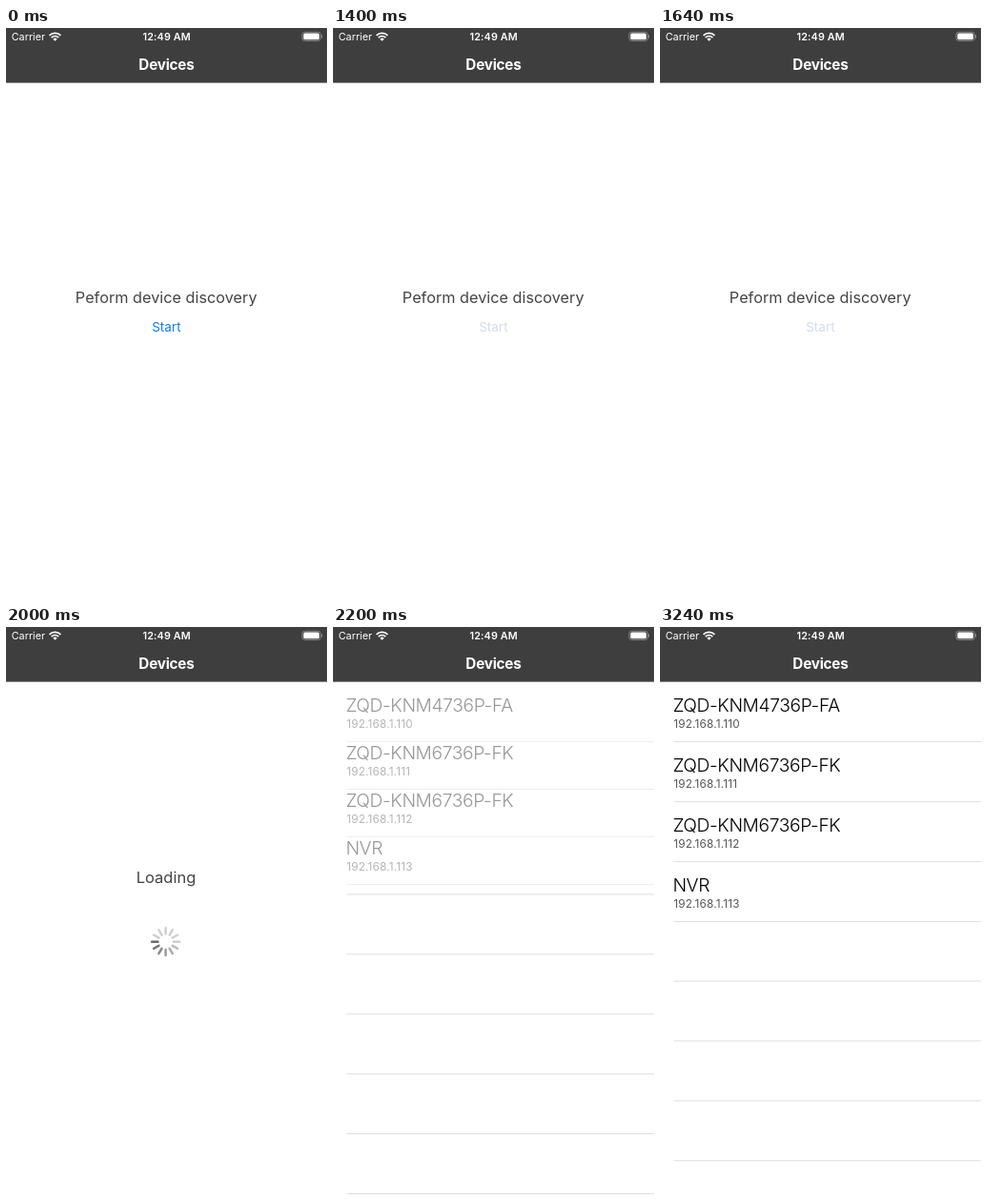
An HTML page with a canvas that plays this animation: 337 px wide and 600 px high, repeating every 3.8 s.

```html
<!DOCTYPE html>
<html lang="en">
<head>
<meta charset="utf-8">
<title>Devices</title>
<style>
html, body { margin: 0; width: 100%; height: 100%; overflow: hidden; background: #fff; }
canvas { display: block; width: 337px; height: 600px; }
</style>
</head>
<body>
<canvas id="stage"></canvas>
<script>
const W = 337, H = 600, LOOP = 3800;
const PRESS = 1400, LOADING = 1800, INSERT = 2200, LIST = 2400;
const canvas = document.getElementById('stage');
const ctx = canvas.getContext('2d');
const scale = window.devicePixelRatio || 1;
canvas.width = W * scale;
canvas.height = H * scale;

const devices = ['ZQD-KNM4736P-FA', 'ZQD-KNM6736P-FK', 'ZQD-KNM6736P-FK', 'NVR'];

function text(str, x, y, size, color, { weight = 400, align = 'left', spacing = 0 } = {}) {
  ctx.font = `${weight} ${size}px Inter, sans-serif`;
  ctx.letterSpacing = spacing + 'px';
  ctx.textAlign = align;
  ctx.fillStyle = color;
  ctx.fillText(str, x, y);
}

function box(x, y, w, h, r, color, stroked) {
  ctx.beginPath();
  ctx.roundRect(x, y, w, h, r);
  if (stroked) {
    ctx.strokeStyle = color;
    ctx.lineWidth = 0.9;
    ctx.stroke();
  } else {
    ctx.fillStyle = color;
    ctx.fill();
  }
}

function wifi(x, y) {
  const half = Math.PI * 0.25, up = -Math.PI / 2;
  ctx.strokeStyle = ctx.fillStyle = '#fff';
  ctx.lineWidth = 1.7;
  for (const r of [8.4, 5.3]) {
    ctx.beginPath();
    ctx.arc(x, y, r, up - half, up + half);
    ctx.stroke();
  }
  ctx.beginPath();
  ctx.moveTo(x, y);
  ctx.arc(x, y, 3, up - half, up + half);
  ctx.fill();
}

function header() {
  ctx.fillStyle = '#3e3e3e';
  ctx.fillRect(0, 0, W, 57);
  ctx.fillStyle = '#858585';
  ctx.fillRect(0, 57, W, 1);
  text('Carrier', 5.7, 13, 10.8, '#fff');
  wifi(51.5, 13.8);
  text('12:49 AM', 168.7, 13, 10.8, '#fff', { weight: 600, align: 'center', spacing: 0.15 });
  box(310.9, 4.3, 19.4, 9.2, 2.6, '#8c8c8c', true);
  box(312.3, 5.6, 16.6, 6.6, 1.5, '#fff');
  box(331, 7.3, 1.1, 3.2, 0.6, '#8c8c8c');
  text('Devices', 168.4, 43.6, 15.3, '#fff', { weight: 650, align: 'center', spacing: -0.25 });
}

function prompt(pressed) {
  text('Peform device discovery', 168.2, 289.2, 16.25, '#444', { align: 'center' });
  text('Start', 168.4, 319.3, 13.5, pressed ? '#d3dcec' : '#0a7ff5', { align: 'center' });
}

function loading() {
  text('Loading', 168, 269, 16.5, '#444', { align: 'center' });
  ctx.lineCap = 'round';
  ctx.lineWidth = 2.5;
  // Spokes fade anticlockwise from the dark one at nine o'clock.
  for (let i = 0; i < 12; i++) {
    const angle = Math.PI - i * Math.PI / 6;
    const grey = Math.min(208, 104 + i * 17);
    const c = Math.cos(angle), s = Math.sin(angle);
    ctx.strokeStyle = `rgb(${grey},${grey},${grey})`;
    ctx.beginPath();
    ctx.moveTo(167.6 + c * 8.2, 330.7 + s * 8.2);
    ctx.lineTo(167.6 + c * 14.4, 330.7 + s * 14.4);
    ctx.stroke();
  }
  ctx.lineCap = 'butt';
}

function rule(y, color) {
  ctx.fillStyle = color;
  ctx.fillRect(14.4, y, W, 0.9);
}

function list(settled) {
  const pitch = settled ? 63 : 50;
  devices.forEach((name, i) => {
    const y = i * pitch;
    text(name, 13.4, 89.4 + y, 19.2, settled ? '#000' : '#979797', { weight: 300, spacing: -0.35 });
    text('192.168.1.11' + i, 14.3, 105.5 + y, 11.7, settled ? '#555' : '#b5b5b5', { spacing: 0.2 });
    rule(120 + y, settled ? '#dedede' : '#ececec');
  });
  for (let y = settled ? 371.6 : 280.5; y < H; y += 62.91) rule(y, '#dadada');
}

function draw(t) {
  ctx.setTransform(scale, 0, 0, scale, 0, 0);
  ctx.fillStyle = '#fff';
  ctx.fillRect(0, 0, W, H);
  header();
  if (t < LOADING) prompt(t >= PRESS);
  else if (t < INSERT) loading();
  else list(t >= LIST);
}

const start = performance.now();
function tick() {
  draw((performance.now() - start) % LOOP);
  requestAnimationFrame(tick);
}
tick();
</script>
</body>
</html>
```
